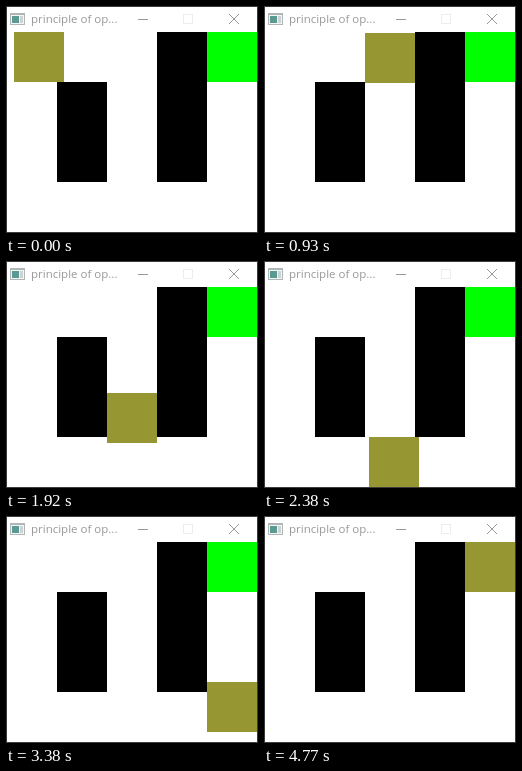
An HTML page for the animation above (4.92 s loop, 252x227 px).

```html
<!DOCTYPE html>
<html lang="en">
<head>
<meta charset="utf-8">
<title>principle of op...</title>
<style>
html, body { margin: 0; width: 100%; height: 100%; overflow: hidden; background: #fff; }
svg { display: block; width: 252px; height: 227px; }
text { font: 11.5px "Open Sans", "Noto Sans", sans-serif; fill: #999; }
</style>
</head>
<body>
<svg viewBox="0 0 252 227">
  <rect width="252" height="227" fill="#fff"/>
  <g shape-rendering="crispEdges">
    <rect x="4" y="7" width="15" height="12" fill="#b0b6b6"/>
    <rect x="5" y="9" width="13" height="9" fill="#f4f6f6"/>
    <rect x="6" y="10" width="7" height="7" fill="#5a9a92"/>
    <rect x="14" y="10" width="3" height="7" fill="#ccd3d3"/>
  </g>
  <text x="25" y="17">principle of op...</text>
  <path d="M132 13.5h10" stroke="#999"/>
  <rect x="177.5" y="8.5" width="9" height="9" fill="none" stroke="#ededed"/>
  <path d="M223 8l10 10M233 8l-10 10" stroke="#999"/>
  <g shape-rendering="crispEdges">
    <path d="M51 76h50v100h-50zM151 26h50v150h-50z"/>
    <rect x="201" y="26" width="50" height="50" fill="#0f0"/>
    <rect id="mover" x="8" y="26" width="50" height="50" fill="#969632"/>
    <rect x=".5" y=".5" width="251" height="226" fill="none" stroke="#3c3c3c"/>
  </g>
</svg>
<script>
const LOOP = 4920;
const STEPS = 62;
const STEP_MS = 4770 / STEPS;
const LEAD = 6; // ms of tolerance for steps timed to whole hundredths
const mover = document.getElementById("mover");
const route = [[8, 26], [101, 26], [101, 176], [201, 176], [201, 26]];

// [step, distance in px]: close to 8 px per step, a little slower at both ends
const pace = [[0, 0], [7, 54], [35, 280], [52, 418], [STEPS, 493]];

function travelled(step) {
  const i = Math.max(1, pace.findIndex(([s]) => s >= step));
  const [s0, d0] = pace[i - 1];
  const [s1, d1] = pace[i];
  return Math.floor(d0 + (d1 - d0) * (step - s0) / (s1 - s0));
}

function pointAt(dist) {
  for (let i = 1; i < route.length; i++) {
    const [x0, y0] = route[i - 1];
    const [x1, y1] = route[i];
    const len = Math.hypot(x1 - x0, y1 - y0);
    if (dist <= len) {
      return [x0 + Math.sign(x1 - x0) * dist, y0 + Math.sign(y1 - y0) * dist];
    }
    dist -= len;
  }
  return route[route.length - 1];
}

function draw(ms) {
  const step = Math.min(STEPS, Math.floor((ms + LEAD) / STEP_MS));
  const [x, y] = pointAt(travelled(step));
  mover.setAttribute("x", x);
  mover.setAttribute("y", y);
}

let start;
function frame(now) {
  start ??= now;
  draw((now - start) % LOOP);
  requestAnimationFrame(frame);
}
draw(0);
requestAnimationFrame(frame);
</script>
</body>
</html>
```
